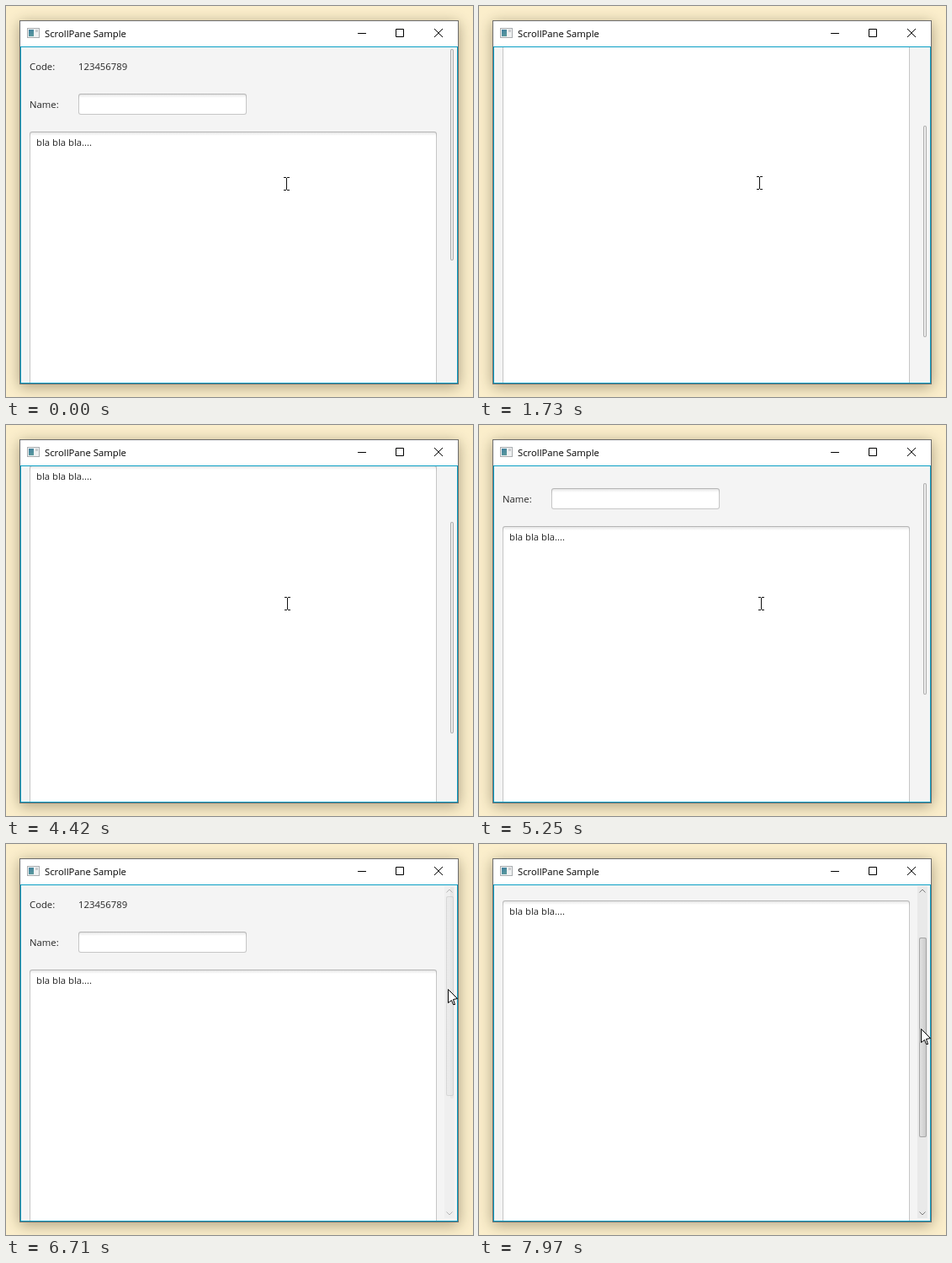
Animation, 555 px wide and 464 px high, one loop 8 s. Source, as an HTML page with a canvas:

```html
<!DOCTYPE html>
<html lang="en">
<head>
<meta charset="utf-8">
<title>ScrollPane Sample</title>
<style>
html, body { margin: 0; width: 100%; height: 100%; overflow: hidden; background: #fbeecb; }
canvas { display: block; }
</style>
</head>
<body>
<canvas id="stage" width="555" height="464"></canvas>
<script>
const ctx = document.getElementById('stage').getContext('2d');
const LOOP = 8000;
const UPDATE = 55;    // ms between screen updates during a movement
const NOTCH = 14.4;   // content pixels per wheel notch
const THIN = 0.634;   // thumb travel per content pixel, slim bar
const WIDE = 0.594;   // the same for the expanded bar

// movements: start, end, where it leads
const wheel = [
  [690, 690, 1], [880, 1070, 5], [1390, 1450, 8], [1680, 1730, 10], [2470, 2510, 8],
  [2880, 2930, 6], [3580, 3580, 9], [3850, 3850, 10], [4320, 4420, 7], [4650, 4700, 4],
  [5020, 5070, 2], [5300, 5340, 0]
];
const hand = [
  [690, 690, 333, 210], [2470, 2470, 334, 212], [5250, 5250, 335, 212],
  [5710, 6330, 520, 180], [6520, 6520, 525, 172], [7270, 7500, 528, 166],
  [7640, 7970, 525, 219]
];
const drag = [[7640, 7970, 82]];
const expand = [[6520, 6850, 1]];
const press = [[7270, 7500, 1]];

const mix = (a, b, p) => a + (b - a) * p;

// eased progress in even updates, the first at a and the last at b
function progress(t, a, b) {
  if (t >= b) return 1;
  const n = Math.round((b - a) / UPDATE);
  const k = Math.floor((t - a) / (b - a) * n + 1e-6);
  return ((k + 1) / (n + 1)) ** 1.25;
}

function follow(t, moves, ...from) {
  return moves.filter(m => t >= m[0]).reduce(
    (pos, [a, b, ...to]) => pos.map((v, i) => mix(v, to[i], progress(t, a, b))), from);
}

function box(x, y, w, h, fill) {
  ctx.fillStyle = fill;
  ctx.fillRect(x, y, w, h);
}

function round(x, y, w, h, r, fill) {
  ctx.fillStyle = fill;
  ctx.beginPath();
  ctx.roundRect(x, y, w, h, r);
  ctx.fill();
}

function line(points, color, close = false) {
  ctx.strokeStyle = color;
  ctx.lineWidth = 1;
  ctx.beginPath();
  points.forEach(([x, y]) => ctx.lineTo(x, y));
  if (close) ctx.closePath();
  ctx.stroke();
}

function text(s, x, y, color = '#262626') {
  ctx.font = '11.3px "Open Sans", "Noto Sans", sans-serif';
  ctx.fillStyle = color;
  ctx.fillText(s, x, y);
}

function shade(x0, y0, x1, y1, from, to) {
  const g = ctx.createLinearGradient(x0, y0, x1, y1);
  g.addColorStop(0, from);
  g.addColorStop(1, to);
  return g;
}

function field(x, y, w, h) {
  round(x, y, w, h, 3, shade(0, y, 0, y + 8, '#b4b4b4', '#c6c6c6'));
  round(x + 1, y + 1, w - 2, h - 2, 2, shade(0, y + 1, 0, y + 5, '#e6e6e6', '#ffffff'));
}

function drawWindow() {
  box(0, 0, 555, 464, '#fbeecb');
  ctx.save();
  ctx.shadowColor = 'rgba(50,40,15,0.4)';
  ctx.shadowBlur = 16;
  ctx.shadowOffsetY = 3;
  box(16, 17, 522, 432, '#6c6c6c');
  ctx.restore();
  box(17, 18, 520, 30, '#ffffff');
  box(17, 48, 520, 400, '#0a9fc4');
  box(18, 49, 518, 398, '#f4f4f4');

  box(25, 26, 15, 12, '#a9adb0');
  box(26, 27, 13, 10, '#eef0f1');
  box(27, 28, 6, 8, shade(27, 28, 33, 36, '#3f7f9f', '#5d9c9c'));
  box(35, 28, 3, 3, '#c9ccce');
  text('ScrollPane Sample', 46, 37, '#000');

  box(418, 32, 10, 1, '#000');
  line([[463.5, 27.5], [472.5, 27.5], [472.5, 36.5], [463.5, 36.5]], '#000', true);
  line([[509, 27], [519, 37]], '#000');
  line([[519, 27], [509, 37]], '#000');
}

function drawContent(scroll) {
  const y = -Math.round(scroll);
  text('Code:', 28, 76 + y);
  text('123456789', 86, 76 + y);
  text('Name:', 28, 121 + y);
  field(86, 104 + y, 200, 25);
  field(28, 149 + y, 484, 480);
  text('bla bla bla....', 36, 166 + y);
}

function drawThinBar(scroll, alpha) {
  const y = 51 + Math.round(scroll * THIN);
  ctx.globalAlpha = alpha;
  round(528, y, 4, 251, 2, '#adadad');
  round(529, y + 1, 2, 249, 1, '#eeeeee');
}

function drawWideBar(scroll, alpha, pressed) {
  const y = 62 + Math.round(scroll * WIDE);
  const grey = (idle, down) => `rgb(${Array(3).fill(Math.round(mix(idle, down, pressed)))})`;
  ctx.globalAlpha = alpha;
  box(521, 50, 12, 394, '#e9e9e9');
  for (const [base, tip] of [[57.5, 54], [436.5, 440]])
    line([[523.5, base], [527, tip], [530.5, base]], '#7c7c7c');
  round(523, y, 9, 237, 2, grey(190, 166));
  round(524, y + 1, 7, 235, 1.5, shade(524, 0, 531, 0, grey(255, 226), grey(248, 202)));
}

function drawBeam(x, y) {
  for (const row of [y - 8, y + 7]) {
    box(x - 3, row, 3, 1, '#111');
    box(x + 1, row, 3, 1, '#111');
  }
  box(x, y - 7, 1, 14, '#111');
}

function drawArrow(x, y) {
  const shape = [[0, 0], [0, 16], [4, 13], [6, 18], [8, 18], [6, 12], [11, 11]]
    .map(([dx, dy]) => [x + 0.5 + dx, y + 0.5 + dy]);
  ctx.fillStyle = '#fff';
  ctx.beginPath();
  shape.forEach(p => ctx.lineTo(...p));
  ctx.fill();
  line(shape, '#000', true);
}

function draw(t) {
  const scroll = Math.round(follow(t, wheel, 0)[0]) * NOTCH + follow(t, drag, 0)[0];
  const [wide] = follow(t, expand, 0);
  drawWindow();
  ctx.save();
  ctx.beginPath();
  ctx.rect(18, 49, 518, 398);
  ctx.clip();
  drawContent(scroll);
  drawThinBar(scroll, (1 - wide) ** 2);
  drawWideBar(scroll, wide, follow(t, press, 0)[0]);
  ctx.restore();
  const [x, y] = follow(t, hand, 333, 211).map(Math.round);
  (x < 512 ? drawBeam : drawArrow)(x, y);
}

const start = performance.now();
function tick() {
  draw((performance.now() - start) % LOOP);
  requestAnimationFrame(tick);
}
tick();
</script>
</body>
</html>
```
